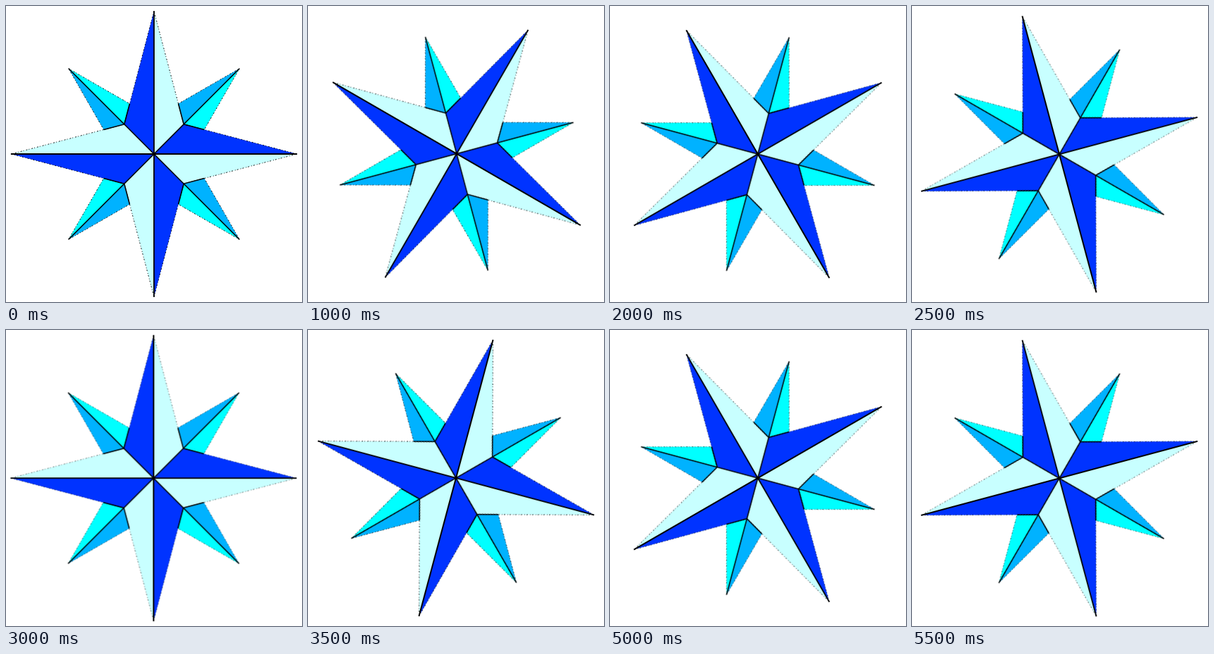
Animation of 420 by 420 pixels, one loop 6000 ms. Source, as an HTML page:

```html
<!DOCTYPE html>
<html lang="en">
<head>
<meta charset="utf-8">
<title>Turning compass star</title>
<style>
  html, body { margin: 0; width: 100%; height: 100%; overflow: hidden; background: #fff; }
  svg { display: block; width: 100vw; height: 100vh; }
  .edge { fill: none; stroke: #000; stroke-width: .9; stroke-dasharray: 1 3 2 2; }
  .line { fill: none; stroke: #000; stroke-width: 1.6; }
  .axis { stroke-width: 1.8; }
</style>
</head>
<body>
<svg viewBox="0 0 420 420">
  <defs>
    <filter id="soft" x="-5%" y="-5%" width="110%" height="110%" color-interpolation-filters="sRGB">
      <feGaussianBlur id="blur" stdDeviation="0"/>
    </filter>
  </defs>
  <g id="star"></g>
</svg>
<script>
const LOOP = 6000, STEP = 500, TURN = 15, CENTER = 210;
const BIG = 202.8, SMALL = 171.5, NOTCH = 42.2, BASE = 36.4;
const star = document.getElementById('star');
const blur = document.getElementById('blur');

const poly = (points, fill) => `<path d="M${points}Z" fill="${fill}"/>`;
const line = (points, cls) => `<path class="${cls}" d="M${points}"/>`;
const fourTimes = (part, start) => [0, 90, 180, 270]
  .map(a => `<g transform="rotate(${a + start})">${part}</g>`).join('');

// A spike points up: dark half on the left, light half on the right.
function spike(tip, base, dark, light) {
  return poly(`0 0L${-base} ${-base}L0 ${-tip}`, dark) +
    poly(`0 0L${base} ${-base}L0 ${-tip}`, light) +
    line(`${-base} ${-base}L0 ${-tip}L${base} ${-base}`, 'edge');
}

// Where the outline of a small spike disappears behind a large one.
function crossing() {
  const a = SMALL / Math.SQRT2, b = BASE * Math.SQRT2;
  const slope = (a - b) / a;
  const steep = (BIG - NOTCH) / NOTCH;
  const x = (BIG - b) / (steep + slope);
  return [x, b + slope * x];
}

const [cx, cy] = crossing();
const small = spike(SMALL, BASE, '#00b2ff', '#00ffff') +
  line(`0 0L0 ${-SMALL}`, 'line');
const big = spike(BIG, NOTCH, '#0033ff', '#c8ffff');
const creases = line(`0 0L0 ${-BIG - .3}`, 'line axis') +
  line(`0 0L${NOTCH} ${-NOTCH}L${cx} ${-cy}`, 'line') +
  line(`${-NOTCH} ${-NOTCH}L${-cx} ${-cy}`, 'line');

star.innerHTML = fourTimes(small, 45) + fourTimes(big, 0) + fourTimes(creases, 0);
const edges = star.querySelectorAll('.edge');
let shown = -1;

function draw(time) {
  const step = Math.floor((time % LOOP) / STEP);
  if (step === shown) return;
  shown = step;
  // The star softens and sways slightly over each half turn.
  const wear = step > 6 ? step - 6 : step;
  const sway = Math.sign(wear) * Math.sin((wear - 1) * 65 * Math.PI / 180);
  star.setAttribute('transform',
    `translate(${CENTER + sway} ${CENTER - sway * .4}) rotate(${step * TURN})`);
  blur.setAttribute('stdDeviation', Math.min(wear * .15, .45));
  if (wear) star.setAttribute('filter', 'url(#soft)');
  else star.removeAttribute('filter');
  edges.forEach(e => e.setAttribute('opacity', 1 - wear * .06));
}

const start = performance.now();
function tick() {
  draw(performance.now() - start);
  requestAnimationFrame(tick);
}
tick();
</script>
</body>
</html>
```
